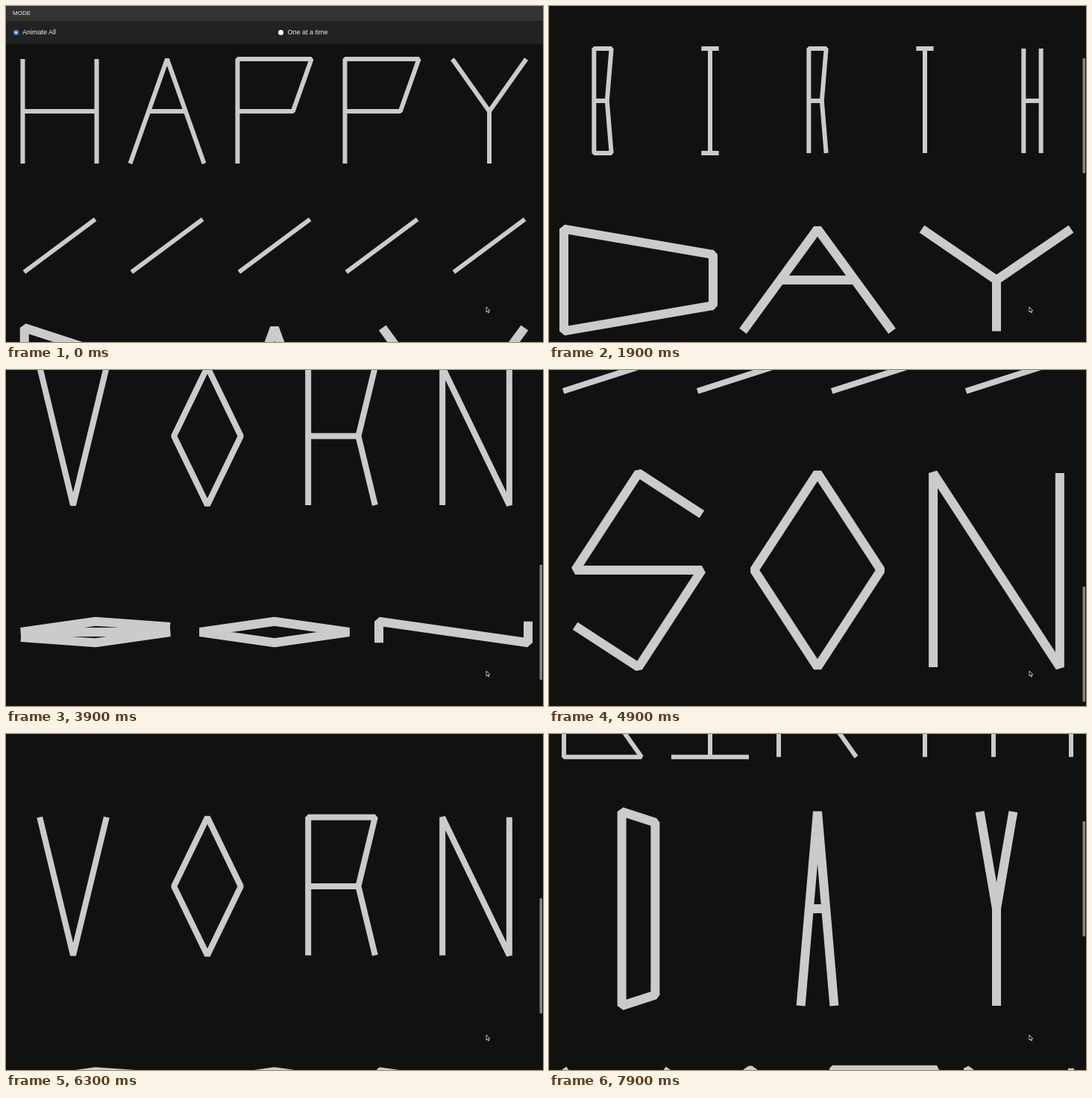
An HTML page with a canvas for the animation above (8 s loop, 720 px wide and 450 px high).

```html
<!DOCTYPE html>
<html lang="en">
<head>
<meta charset="utf-8">
<title>Line letters</title>
<style>
html, body { margin: 0; width: 100%; height: 100%; overflow: hidden; background: #111; }
#stage { position: relative; width: 720px; height: 450px; overflow: hidden; }
canvas { position: absolute; left: 0; top: 0; }
header { position: absolute; left: 0; top: 0; width: 720px; height: 51px; background: #222;
  color: #eee; font: 9px/31px "Liberation Sans", Arial, sans-serif; }
header div { height: 20px; background: #333; font-size: 8px; line-height: 19px; padding-left: 9px; }
label { position: absolute; top: 20px; white-space: nowrap; }
label i { position: absolute; left: -12.5px; top: 11.5px; width: 7.4px; height: 7.4px;
  border-radius: 50%; background: #fff; }
label.on i { background: radial-gradient(circle, #fff 0.8px, #3b8bef 1.5px); }
</style>
</head>
<body>
<div id="stage">
  <header>
    <div>MODE</div>
    <label class="on" style="left:22px"><i></i>Animate All</label>
    <label style="left:377.5px"><i></i>One at a time</label>
  </header>
  <canvas id="c" width="720" height="450"></canvas>
</div>
<script>
const ctx = document.getElementById('c').getContext('2d');
const header = document.querySelector('header');

const LOOP = 8000, STEP = 100;
const UNIT = 960;             // ms to squash one axis; the turn takes half of it
const CYCLE = 2.5, START = 0.047;
const PAGE = 1275, VIEW = 450;

// Strokes on a quarter grid: each pair of digits is x, y; "z" closes the path.
const GLYPHS = {
  H: '0004 4044 0242', A: '042044 1232', P: '0400403202', Y: '002240 2224',
  B: '0040324404z 0232', I: '0040 2024 0444', R: '0400403244 0232', T: '0040 2024',
  D: '00414304z', V: '002440', O: '20422402z', N: '04004440', S: '412002422403'
};

const ROWS = [
  { word: 'HAPPY', width: 6 },
  { word: 'BIRTH', width: 6 },
  { word: 'DAY', width: 12 },
  { word: 'VORN', width: 8 },
  { word: 'SON', width: 12 }
];

let rowTop = 51;
ROWS.forEach((row, i) => {
  row.cell = 720 / row.word.length;
  row.w = row.cell - 40;
  row.h = row.cell * 1.25 - 40;
  row.y = rowTop + row.cell * 0.625;
  row.shift = i % 2 * CYCLE / 2;
  rowTop += row.cell * 1.25;
});

const SCROLL = [[0, 0], [950, 0], [1900, 194], [2900, 429], [3900, 735],
  [4500, 818], [5200, 818], [5800, 718], [6900, 501], [7900, 327], [8000, 311]];

function slope(i) {
  const a = SCROLL[i - 1], b = SCROLL[i], c = SCROLL[i + 1];
  if (!a || !c || a[1] === b[1] || b[1] === c[1]) return 0;
  return (c[1] - a[1]) / (c[0] - a[0]);
}

function scrollAt(t) {
  let i = 0;
  while (i < SCROLL.length - 2 && t >= SCROLL[i + 1][0]) i++;
  const [t0, y0] = SCROLL[i], [t1, y1] = SCROLL[i + 1];
  const d = t1 - t0, u = (t - t0) / d, v = 1 - u;
  return y0 * v * v * (1 + 2 * u) + y1 * u * u * (3 - 2 * u)
    + d * u * v * (v * slope(i) - u * slope(i + 1));
}

function drawGlyph(name, place) {
  ctx.beginPath();
  for (const stroke of GLYPHS[name].split(' ')) {
    const closed = stroke.endsWith('z');
    const digits = closed ? stroke.slice(0, -1) : stroke;
    for (let i = 0; i < digits.length; i += 2) {
      const [x, y] = place(digits[i] / 4 - 0.5, digits[i + 1] / 4 - 0.5);
      i ? ctx.lineTo(x, y) : ctx.moveTo(x, y);
    }
    if (closed) ctx.closePath();
  }
  ctx.stroke();
}

function drawTurn(row, k) {
  const a = k * Math.PI / 2;
  const len = (row.h + (row.w - row.h) * k) / 2;
  const x = len * Math.sin(a), y = -len * Math.cos(a);
  ctx.beginPath();
  ctx.moveTo(x, y);
  ctx.lineTo(-x, -y);
  ctx.stroke();
}

function drawRow(row, t, scroll) {
  const p = (START + row.shift + t / UNIT) % CYCLE;
  const narrow = 1 - p, flat = p - 1.5;
  // While narrowing, points slide to the ends or the middle of an upright line.
  const squeeze = (x, y) => {
    const end = Math.sign(y) / 2;
    return [x * narrow * row.w, (end + (y - end) * narrow) * row.h];
  };
  const flatten = (x, y) => [x * row.w, y * flat * row.h];

  ctx.lineWidth = row.width;
  [...row.word].forEach((letter, i) => {
    ctx.save();
    ctx.translate((i + 0.5) * row.cell, row.y - scroll);
    if (p < 1) drawGlyph(letter, squeeze);
    else if (p < 1.5) drawTurn(row, (p - 1) * 2);
    else drawGlyph(letter, flatten);
    ctx.restore();
  });
}

function drawScrollbar(scroll) {
  const k = VIEW / PAGE;
  ctx.fillStyle = '#888';
  ctx.beginPath();
  ctx.roundRect(715.5, scroll * k + 1, 3.5, VIEW * k - 4, 1.75);
  ctx.fill();
}

function drawPointer() {
  ctx.save();
  ctx.translate(644, 403);
  ctx.beginPath();
  [[0, 0], [0, 7], [1.6, 5.6], [2.7, 8], [3.7, 7.5], [2.7, 5.2], [4.8, 5]]
    .forEach(([x, y]) => ctx.lineTo(x, y));
  ctx.closePath();
  ctx.fillStyle = '#000';
  ctx.fill();
  ctx.lineWidth = 0.8;
  ctx.strokeStyle = '#eee';
  ctx.stroke();
  ctx.restore();
}

function draw(t) {
  const scroll = scrollAt(t);
  header.style.transform = `translateY(${-scroll}px)`;
  ctx.clearRect(0, 0, 720, VIEW);
  ctx.strokeStyle = '#cbcbcb';
  ctx.lineJoin = 'bevel';
  ctx.lineCap = 'butt';
  for (const row of ROWS) drawRow(row, t, scroll);
  if (scroll > 0) drawScrollbar(scroll);
  drawPointer();
}

const begin = performance.now();
function tick() {
  const t = (performance.now() - begin) % LOOP;
  draw(Math.floor(t / STEP) * STEP);
  requestAnimationFrame(tick);
}
tick();
</script>
</body>
</html>
```
